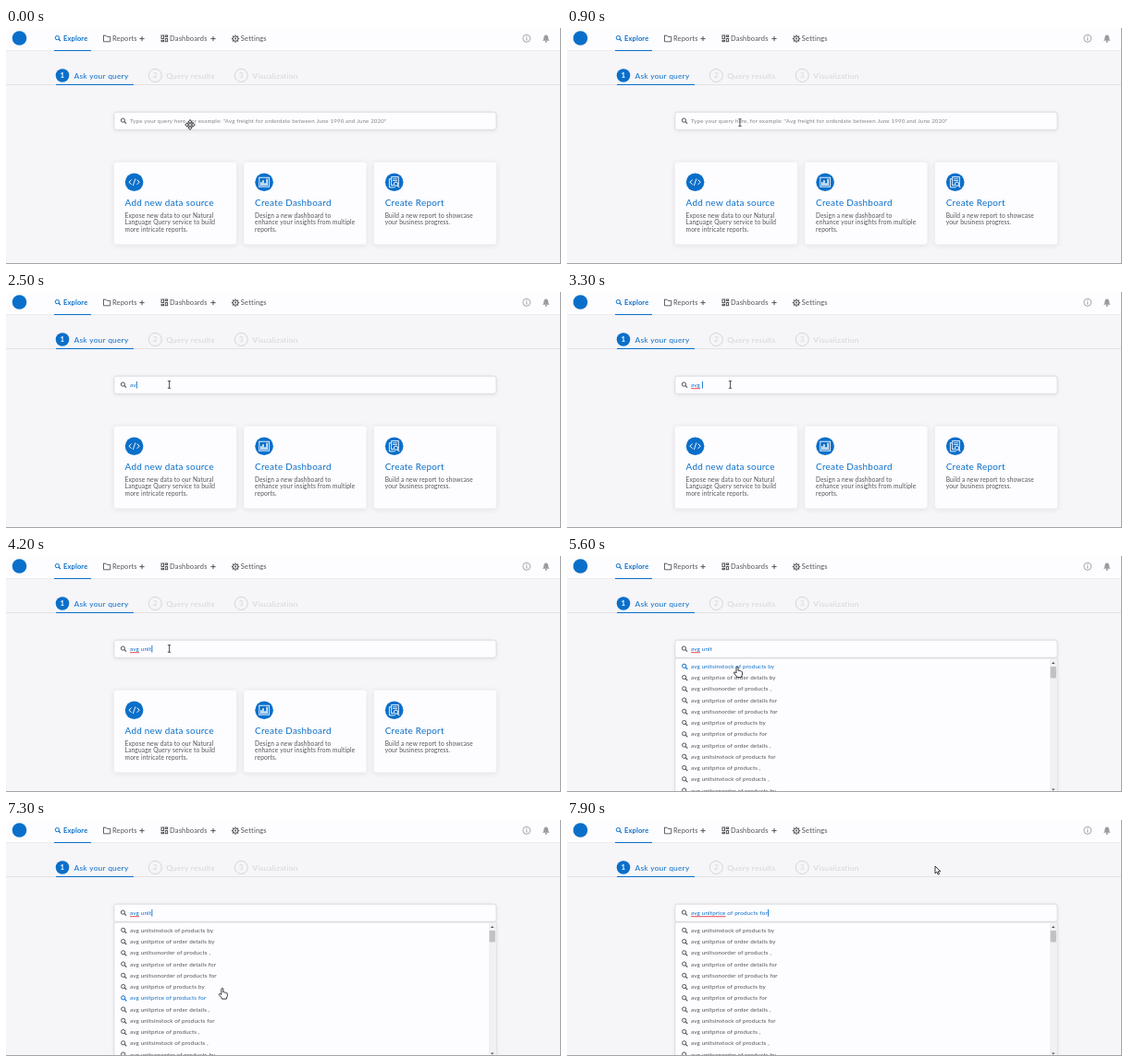
Write an HTML page with a canvas that moves like this. It is 600 px wide and 256 px high and loops after 8000 ms.

```html
<!DOCTYPE html>
<html lang="en">
<head>
<meta charset="utf-8">
<title>Query search</title>
<style>
html, body { margin: 0; width: 100%; height: 100%; overflow: hidden; background: #f6f5f8; }
canvas { display: block; width: 600px; height: 256px; }
</style>
</head>
<body>
<canvas id="stage"></canvas>
<script>
const W = 600, H = 256, LOOP = 8000;
const BLUE = '#0a6fca', DARK = '#505359', PALE = '#d5d5d9';
const canvas = document.getElementById('stage');
const c = canvas.getContext('2d');
const dpr = window.devicePixelRatio || 1;
canvas.width = W * dpr;
canvas.height = H * dpr;

const PLACEHOLDER = 'Type your query here, for example: "Avg freight for orderdate between June 1990 and June 2020"';
const CHOICE = 'avg unitprice of products for';
const ROWS = [
  'avg unitsinstock of products by', 'avg unitprice of order details by',
  'avg unitsonorder of products ,', 'avg unitprice of order details for',
  'avg unitsonorder of products for', 'avg unitprice of products by',
  CHOICE, 'avg unitprice of order details ,',
  'avg unitsinstock of products for', 'avg unitprice of products ,',
  'avg unitsinstock of products ,', 'avg unitsonorder of products by'
];
const ROW_TOP = 113.4, ROW_STEP = 12.25;
const KEYS = [2250, 2430, 2780, 3080, 3380, 3600, 3820, 4020];
const FOCUS = 1600, OPEN = 4400, PICK = 7420;
const CLICKS = [[1500, 1850], [6960, 7180]];
// time, x, y of the pointer
const PATH = [
  [0, 199, 105], [500, 199, 105], [1250, 176.5, 100.5], [5450, 176.5, 100.5],
  [5530, 181, 115], [5600, 184, 120], [5900, 188, 127], [6300, 203, 156],
  [6500, 215.5, 177], [6720, 216, 204], [6930, 215, 196], [7250, 215, 196],
  [7480, 300, 135], [7750, 398, 50], [8000, 398, 50]
];

// slightly tracked type, for wide and low letters
function text(s, x, y, size, color, weight = 400) {
  c.font = `${weight} ${size * 0.95}px Lato, "Open Sans", sans-serif`;
  c.letterSpacing = `${size * 0.024}px`;
  c.fillStyle = color;
  c.fillText(s, x, y);
}
function rect(x, y, w, h, color) {
  c.fillStyle = color;
  c.fillRect(x, y, w, h);
}
function disc(x, y, r, color) {
  c.fillStyle = color;
  c.beginPath();
  c.arc(x, y, r, 0, 7);
  c.fill();
}
function ring(x, y, r, color, lw = 1) {
  c.strokeStyle = color;
  c.lineWidth = lw;
  c.beginPath();
  c.arc(x, y, r, 0, 7);
  c.stroke();
}
function line(color, lw, ...pts) {
  c.strokeStyle = color;
  c.lineWidth = lw;
  c.beginPath();
  pts.forEach(([x, y]) => c.lineTo(x, y));
  c.stroke();
}
function poly(color, ...pts) {
  c.fillStyle = color;
  c.beginPath();
  pts.forEach(([x, y]) => c.lineTo(x, y));
  c.fill();
}
function panel(x, y, w, h, r, blur, border) {
  c.save();
  c.shadowColor = 'rgba(40,40,70,.11)';
  c.shadowBlur = blur * dpr;
  c.shadowOffsetY = dpr;
  c.fillStyle = '#fdfcfe';
  c.beginPath();
  c.roundRect(x, y, w, h, r);
  c.fill();
  c.restore();
  if (border) {
    c.strokeStyle = border;
    c.lineWidth = 0.8;
    c.stroke();
  }
}
function lens(x, y, color) {
  ring(x - 0.6, y - 0.6, 2.1, color, 1);
  line(color, 1.2, [x + 1, y + 1], [x + 3, y + 3]);
}
function plus(x, y) {
  line(DARK, 1, [x - 2.6, y], [x + 2.6, y]);
  line(DARK, 1, [x, y - 2.6], [x, y + 2.6]);
}

function header() {
  rect(0, 0, W, 24.5, '#fdfcfe');
  rect(0, 24.3, W, 0.7, '#e9e8ec');
  disc(14.5, 11, 7.8, BLUE);
  lens(56, 11.2, BLUE);
  text('Explore', 62, 14.1, 7.8, BLUE, 700);
  rect(52, 24, 40, 1, BLUE);

  line(DARK, 0.9, [105.5, 8.2], [108, 8.2], [109, 9.4], [112.7, 9.4], [112.7, 14.8], [105.5, 14.8], [105.5, 7.8]);
  text('Reports', 115, 14.1, 7.85, DARK);
  plus(147, 11.6);

  c.strokeStyle = DARK;
  c.lineWidth = 1;
  c.strokeRect(168, 8, 2.5, 3.4);
  c.strokeRect(172.3, 8, 2.3, 1.6);
  c.strokeRect(168, 13.3, 2.5, 1.4);
  c.strokeRect(172.3, 11.5, 2.3, 3.2);
  text('Dashboards', 177, 14.1, 7.85, DARK);
  plus(224, 11.6);

  for (let i = 0; i < 8; i++) {
    const a = i * Math.PI / 4, x = Math.cos(a), y = Math.sin(a);
    line(DARK, 1.3, [248 + x * 2.8, 11.6 + y * 2.8], [248 + x * 4.2, 11.6 + y * 4.2]);
  }
  ring(248, 11.6, 2.7, DARK, 1);
  disc(248, 11.6, 1, DARK);
  text('Settings', 253.8, 14.1, 7.9, DARK);

  const grey = '#9b9ca1';
  ring(562.8, 11.3, 4, grey, 0.9);
  rect(562.3, 10.6, 1, 3, grey);
  rect(562.3, 8.8, 1, 1, grey);

  c.fillStyle = grey;
  c.beginPath();
  c.moveTo(580, 13.8);
  c.quadraticCurveTo(581.4, 12.5, 581.4, 10.4);
  c.bezierCurveTo(581.4, 6.4, 586.2, 6.4, 586.2, 10.4);
  c.quadraticCurveTo(586.2, 12.5, 587.6, 13.8);
  c.fill();
  disc(583.8, 14.8, 1.1, grey);
}

function steps() {
  rect(0, 61, W, 0.8, '#dfdee2');
  rect(54, 61, 84, 1, BLUE);
  [[61, 'Ask your query', 73.6], [161.3, 'Query results', 173.2], [254.3, 'Visualization', 266.3]].forEach(([x, label, tx], i) => {
    if (i) ring(x, 51.5, 7, PALE, 1);
    else disc(x, 51.5, 7.3, BLUE);
    c.textAlign = 'center';
    text(i + 1, x, 54.4, 8.3, i ? PALE : '#fff', i ? 400 : 700);
    c.textAlign = 'left';
    text(label, tx, 54.6, 8.87, i ? PALE : BLUE);
  });
}

function codeIcon(x, y) {
  line('#fff', 1, [x - 3, y - 2.6], [x - 5.6, y], [x - 3, y + 2.6]);
  line('#fff', 1, [x + 3, y - 2.6], [x + 5.6, y], [x + 3, y + 2.6]);
  line('#fff', 0.9, [x + 1.3, y - 3.8], [x - 1.3, y + 3.8]);
}
function chartIcon(x, y) {
  c.strokeStyle = '#fff';
  c.lineWidth = 0.9;
  c.strokeRect(x - 5.3, y - 5, 10.6, 10);
  [4, 6, 3, 7.5].forEach((h, i) => rect(x - 4 + i * 2.1, y + 4 - h, 1.5, h, '#fff'));
}
function reportIcon(x, y) {
  line('#fff', 0.9, [x + 1, y + 5.6], [x - 5.3, y + 5.6], [x - 5.3, y - 3.5], [x - 3.2, y - 3.5]);
  c.strokeStyle = '#fff';
  c.strokeRect(x - 3, y - 5.6, 7.6, 9);
  [0, 1].forEach(i => rect(x - 1.6, y - 3.8 + i * 1.8, 4.8, 0.8, '#fff'));
  disc(x + 1.8, y + 2, 2.6, BLUE);
  ring(x + 1.8, y + 2, 2.1, '#fff', 1);
  line('#fff', 1.1, [x + 3.4, y + 3.6], [x + 5.5, y + 5.7]);
}
const CARDS = [
  [116.7, codeIcon, 'Add new data source', 'Expose new data to our Natural', 'Language Query service to build', 'more intricate reports.'],
  [257.2, chartIcon, 'Create Dashboard', 'Design a new dashboard to', 'enhance your insights from multiple', 'reports.'],
  [397.8, reportIcon, 'Create Report', 'Build a new report to showcase', 'your business progress.']
];
function cards() {
  CARDS.forEach(([x, icon, title, ...lines]) => {
    panel(x, 145.5, 132.4, 89.2, 3, 6);
    disc(x + 21.9, 167.2, 9.8, BLUE);
    icon(x + 21.9, 167.2);
    text(title, x + 11.9, 193.4, 10.44, BLUE);
    lines.forEach((s, i) => text(s, x + 11.9, 206.1 + i * 7.35, 6.9, DARK));
  });
}

function pointer(t) {
  let i = 1;
  while (i < PATH.length - 1 && PATH[i][0] < t) i++;
  const [t0, x0, y0] = PATH[i - 1], [t1, x1, y1] = PATH[i];
  const k = Math.max(0, Math.min(1, (t - t0) / (t1 - t0)));
  return [x0 + (x1 - x0) * k, y0 + (y1 - y0) * k];
}

function searchBox(t) {
  panel(116.8, 91.2, 413.2, 19.2, 2.5, 4, '#d9d8dd');
  lens(127, 100.7, DARK);
  const typed = KEYS.filter(k => k <= t).length;
  const value = t >= PICK ? CHOICE : 'avg unit'.slice(0, typed);
  if (value) text(value, 134, 102.9, 6.65, BLUE);
  else text(PLACEHOLDER, 134, 102.9, 6.48, '#85868b');

  const width = value ? c.measureText(value).width : 0;
  if (typed > 3) {
    const word = t >= PICK ? 'avg unitprice' : 'avg';
    rect(134, 104.3, c.measureText(word).width, 0.9, '#e5383f');
  }
  if (t >= FOCUS) {
    const last = [FOCUS, ...KEYS, PICK].filter(k => k <= t).pop();
    if ((t - last) % 1000 < 500) rect(134.2 + width, 97, 0.9, 7.6, BLUE);
  }
}

function list(t) {
  if (t < OPEN) return;
  panel(116.8, 111, 413.2, 150, 0, 4, '#d9d8dd');
  const [x, y] = pointer(t - 60);
  const hover = t < PICK && x < 521 && y >= ROW_TOP ? Math.floor((y - ROW_TOP) / ROW_STEP) : -1;
  ROWS.forEach((s, i) => {
    const mid = 119.6 + i * ROW_STEP, color = i === hover ? BLUE : DARK;
    lens(127.3, mid + 0.3, color);
    text(s, 134, mid + 2.2, 6.58, color);
  });
  rect(522, 111.4, 7.4, 144, '#f1f1f2');
  rect(522.6, 120, 6.3, 12.4, '#c1c1c3');
  poly('#55565a', [523.9, 117], [525.7, 114.9], [527.5, 117]);
  poly('#55565a', [523.9, 252.5], [525.7, 254.6], [527.5, 252.5]);
}

function moveCursor() {
  for (let i = 0; i < 4; i++) {
    c.save();
    c.rotate(i * Math.PI / 2);
    c.beginPath();
    [[-0.8, -0.8], [-0.8, -2.9], [-2.2, -2.9], [0, -5.4], [2.2, -2.9], [0.8, -2.9], [0.8, -0.8]].forEach(p => c.lineTo(...p));
    c.fillStyle = '#fff';
    c.fill();
    c.strokeStyle = '#222';
    c.lineWidth = 0.9;
    c.stroke();
    c.restore();
  }
}
function beam() {
  line('#444', 0.9, [0, -3.8], [0, 3.8]);
  line('#444', 0.9, [-1.7, -3.8], [1.7, -3.8]);
  line('#444', 0.9, [-1.7, 3.8], [1.7, 3.8]);
}
function outline(path) {
  c.fillStyle = '#fff';
  c.fill(path);
  c.strokeStyle = '#222';
  c.lineWidth = 0.9;
  c.lineJoin = 'round';
  c.stroke(path);
  c.lineJoin = 'miter';
}
const HAND = new Path2D('M-1 7V1Q-1 0 0 0Q1 0 1 1V4.3Q2.2 3.7 2.8 4.7Q4 4.2 4.3 5.2Q5.5 5 5.5 6.2V8Q5.5 9.5 4.5 10.5V11.6H-.6V10.6L-3.6 7Q-3.6 5.6-2.3 6Z');
const ARROW = new Path2D('M0 0V8L1.9 6.3L3.2 9.1L4.5 8.5L3.2 5.8H5.7Z');

function cursor(t) {
  const [x, y] = pointer(t);
  if (CLICKS.some(([a, b]) => t >= a && t < b)) disc(x - 0.6, y, 15.3, 'rgba(250,212,72,.6)');
  c.save();
  c.translate(x, y);
  const inBox = x > 117 && x < 530 && y > 91;
  if (t < 700) moveCursor();
  else if (inBox && y < 111) beam();
  else if (inBox) outline(HAND);
  else outline(ARROW);
  c.restore();
}

function draw(t) {
  c.setTransform(dpr, 0, 0, dpr, 0, 0);
  rect(0, 0, W, H, '#f6f5f8');
  header();
  steps();
  if (t < OPEN) cards();
  searchBox(t);
  list(t);
  rect(0, 255, W, 1, '#a5a5a9');
  rect(599, 0, 1, H, '#a5a5a9');
  cursor(t);
}

const start = performance.now();
function tick() {
  draw((performance.now() - start) % LOOP);
  requestAnimationFrame(tick);
}
tick();
</script>
</body>
</html>
```
